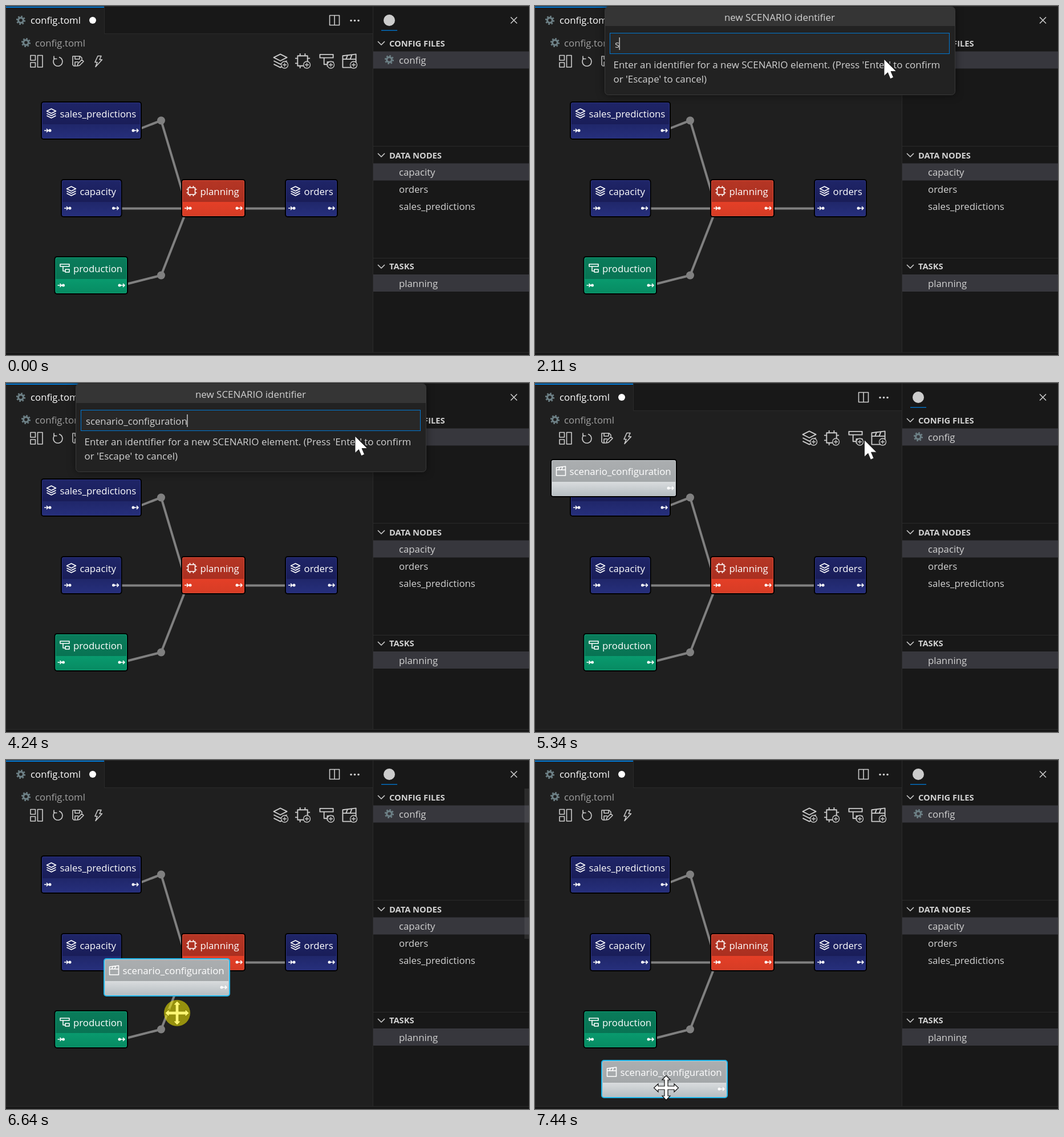
An HTML page for the animation above (8000 ms loop, 917 by 611 pixels).

```html
<!DOCTYPE html>
<html lang="en">
<head>
<meta charset="utf-8">
<title>Configuration editor</title>
<style>
  html, body { margin: 0; width: 100%; height: 100%; overflow: hidden; background: #1f1f1f; }
  svg { display: block; width: 917px; height: 611px; }
  text { font: 16.8px "Open Sans", "Noto Sans", sans-serif; fill: #d2d2d2; white-space: pre; }
  .head { font-size: 14.7px; font-weight: 700; }
  .white { fill: #fff; }
  .line { fill: none; stroke: #ccc; stroke-width: 1.6; stroke-linejoin: round; }
  .icon { fill: none; stroke: #fff; stroke-width: 1.6; stroke-linejoin: round; }
  .tool { stroke: #ccc; stroke-width: 1.3; }
  .link { fill: none; stroke: #808080; stroke-width: 4; }
  .dialog text { font-size: 16.95px; }
  .dialog #typed { font-size: 16.75px; }
  .panel { fill: #222; stroke: #393939; filter: drop-shadow(0 0 7px rgba(0, 0, 0, .5)); }
</style>
</head>
<body>
<svg viewBox="0 0 917 611">
  <defs>
    <g id="layers"><path d="M0-8 8-4 0 0-8-4ZM-8 0 0 4 8 0M-8 4 0 8 8 4"/></g>
    <g id="chip"><path d="M-6-6H6V6H-6ZM-3-6V-9M3-6V-9M-3 6V9M3 6V9M-6-3H-9M-6 3H-9M6-3H9M6 3H9"/></g>
    <g id="flow"><path d="M-8-7H8V-3H-8ZM-3-3V5H1M1 2H8V7H1Z"/></g>
    <g id="clap"><path d="M-8-2H8V8H-8ZM-8-2V-6L8-8V-2M-4-2-2-7M1-2 3-7"/></g>
    <g id="gear" fill="none" stroke="#6d8086">
      <circle r="4.4" stroke-width="3.2"/>
      <circle r="6.8" stroke-width="2.6" stroke-dasharray="2.67 2.67"/>
    </g>
    <g id="plus"><circle r="6" fill="#1f1f1f"/><path d="M-3.5 0H3.5M0-3.5V3.5"/></g>
    <path id="chevron" class="line" d="M-6-3 0 3 6-3"/>
    <linearGradient id="navyTop" x2="0" y2="1"><stop stop-color="#1f2568"/><stop offset="1" stop-color="#191d58"/></linearGradient>
    <linearGradient id="navyLow" x2="0" y2="1"><stop stop-color="#20276a"/><stop offset="1" stop-color="#262f7c"/></linearGradient>
    <linearGradient id="redTop" x2="0" y2="1"><stop stop-color="#b53625"/><stop offset="1" stop-color="#aa2f20"/></linearGradient>
    <linearGradient id="redLow" x2="0" y2="1"><stop stop-color="#e43f27"/><stop offset="1" stop-color="#d63c25"/></linearGradient>
    <linearGradient id="greenTop" x2="0" y2="1"><stop stop-color="#0a7c5b"/><stop offset="1" stop-color="#087353"/></linearGradient>
    <linearGradient id="greenLow" x2="0" y2="1"><stop stop-color="#099a6e"/><stop offset="1" stop-color="#078b62"/></linearGradient>
    <linearGradient id="greyTop" x2="0" y2="1"><stop stop-color="#abaeb0"/><stop offset="1" stop-color="#a3a7a9"/></linearGradient>
    <linearGradient id="greyLow" x2="0" y2="1"><stop stop-color="#d9dcde"/><stop offset="1" stop-color="#b6bdc1"/></linearGradient>
  </defs>

  <!-- editor frame -->
  <rect width="917" height="611" fill="#1f1f1f"/>
  <rect x="172" width="471" height="48" fill="#181818"/>
  <path d="M172.5 1V48.5H643M0 .5H917" fill="none" stroke="#2b2b2b"/>
  <rect y="1" width="172" height="2" fill="#0078d4"/>
  <use href="#gear" x="26" y="25"/>
  <text class="white" x="43" y="31">config.toml</text>
  <circle cx="152" cy="25" r="6" fill="#fff"/>
  <use href="#gear" x="35" y="64"/>
  <text x="51" y="71" style="fill:#a0a0a0">config.toml</text>
  <path class="line" d="M567.5 16.5H584.5V33.5H567.5ZM576 16.5V33.5"/>
  <g fill="#ccc"><circle cx="605" cy="25.5" r="1.8"/><circle cx="611.5" cy="25.5" r="1.8"/><circle cx="618" cy="25.5" r="1.8"/></g>

  <!-- toolbar -->
  <path class="line" d="M43 86.5H51.5V95H43ZM43 99H51.5V107H43ZM55.5 86.5H64V107H55.5Z"/>
  <path class="line" d="M85.5 91.5A8 8 0 1 0 93 89.5M84 87.5V92.5H89.5"/>
  <path class="line" d="M124 105H119L117 103V88H130L133 91V93M121 88V93H129V88M121 105V98H127M125 105 126 101 133 94 136 97 129 104Z"/>
  <path class="line" d="M161 87.5H167L164 94H168.5L157 106.5 160 98.5H156Z"/>
  <rect id="hover" x="588" y="79" width="28" height="36" rx="5" fill="#5a5d5e" fill-opacity=".31"/>
  <g class="icon tool" id="tools"></g>

  <!-- graph -->
  <path class="link" d="M227 218 272 200.5 318 354.5H192M203 489 272 471.5 318 354.5M408 354.5H500"/>
  <circle cx="272" cy="200.5" r="7" fill="#808080"/>
  <circle cx="272" cy="471.5" r="7" fill="#808080"/>
  <g id="nodes"></g>

  <!-- side bar -->
  <rect x="643" y="1" width="274" height="606" fill="#181818"/>
  <rect y="606" width="917" height="5" fill="#181818"/>
  <path d="M643.5 1V606M644 245.5H917M644 441.5H917M0 606.5H917" stroke="#2b2b2b" fill="none"/>
  <circle cx="672" cy="25" r="10" fill="#ccc"/>
  <rect x="658" y="42" width="28" height="1.3" fill="#0078d4"/>
  <path class="line" d="M885 19.5 896 30.5M896 19.5 885 30.5"/>
  <g fill="#37373d"><rect x="644" y="79.5" width="273" height="30"/><rect x="644" y="275.5" width="273" height="30"/><rect x="644" y="470" width="273" height="30"/></g>
  <use href="#chevron" x="658" y="65"/>
  <text class="head" x="672" y="70.5">CONFIG FILES</text>
  <use href="#gear" x="672" y="94"/>
  <text x="689" y="101">config</text>
  <use href="#chevron" x="658" y="261"/>
  <text class="head" x="672" y="266.5">DATA NODES</text>
  <text x="689" y="297">capacity</text>
  <text x="689" y="327">orders</text>
  <text x="689" y="357">sales_predictions</text>
  <use href="#chevron" x="658" y="456"/>
  <text class="head" x="672" y="461">TASKS</text>
  <text x="689" y="491.5">planning</text>
  <rect id="scroll" x="909" y="50" width="8" height="263" fill="#797979" fill-opacity=".2"/>

  <!-- input dialog -->
  <g id="dialog" class="dialog">
    <rect class="panel" x="122.5" y="1.5" width="614" height="154" rx="6"/>
    <path d="M123 35V7.5Q123 2 128.5 2H730.5Q736 2 736 7.5V35Z" fill="#353535"/>
    <text x="429" y="25.5" text-anchor="middle">new SCENARIO identifier</text>
    <rect x="131.5" y="47.5" width="595" height="36" fill="#282828" stroke="#0078d4"/>
    <text id="typed" x="140" y="72.5"></text>
    <rect id="caret" y="55" width="1.3" height="22" fill="#ddd"/>
    <text x="137.5" y="109">Enter an identifier for a new SCENARIO element. (Press 'Enter' to confirm</text>
    <text x="137.5" y="133.5">or 'Escape' to cancel)</text>
  </g>

  <!-- pointer -->
  <g id="pointer">
    <path id="arrow" d="M0 0V29.5L6.5 23.5 11 34.5 16.5 32 12 21.5H21.5Z" fill="#fff" stroke="#111" stroke-width=".8"/>
    <path id="cross" d="M0-21.5 7-14H3V-3H14V-7L21.5 0 14 7V3H3V14H7L0 21.5-7 14H-3V3H-14V7L-21.5 0-14-7V-3H-3V-14H-7Z" fill="#fff" stroke="#111" stroke-width="1.2"/>
    <circle id="press" r="23" fill="#f8ee00" fill-opacity=".55"/>
  </g>
</svg>
<script>
const $ = id => document.getElementById(id);
const show = (id, on) => $(id).setAttribute('visibility', on ? 'inherit' : 'hidden');
const move = (el, x, y) => el.setAttribute('transform', `translate(${x} ${y})`);

const LOOP = 8000;
const NAME = 'scenario_configuration';
const HOME = [612, 93], GRAB = [146, 183], ENTER = [895, 322];
// start time, characters at first and last key of each burst
const BURSTS = [[2110, 1, 8], [2930, 9, 16], [3840, 18, 22]];
// pointer while dragging, one point per 100 ms from 6340
const DRAG = [GRAB, [225, 300], [290, 397], [300, 443], [308, 485], [310, 525], [302, 549],
  [278, 551], [266, 554], [250, 566], [235, 575], [230, 574]];

[['layers', 481, 96], ['chip', 520, 96], ['flow', 562, 95], ['clap', 602, 96]].forEach(([icon, x, y]) => {
  $('tools').innerHTML += `<use href="#${icon}" transform="translate(${x} ${y}) scale(1.45)"/>
    <use href="#plus" x="${x + 7.5}" y="103"/>`;
});

function addNode(id, icon, x, y, w, color, edge, input = true) {
  const ports = (input ? '<path class="icon" d="M6 51H13M10 48 13 51 10 54"/><circle class="white" cx="16" cy="51" r="2.5"/>' : '') +
    `<path class="icon" d="M${w - 14} 51H${w - 6}M${w - 9} 48l3 3-3 3"/><circle class="white" cx="${w - 15}" cy="51" r="2.5"/>`;
  $('nodes').innerHTML += `<g id="${id}" transform="translate(${x} ${y})">
    <rect class="frame" width="${w}" height="67" rx="5" fill="#000"/>
    <path d="M2 40V5Q2 2 5 2H${w - 5}Q${w - 2} 2 ${w - 2} 5V40Z" fill="url(#${color}Top)"/>
    <path d="M2 40V62Q2 65 5 65H${w - 5}Q${w - 2} 65 ${w - 2} 62V40Z" fill="url(#${color}Low)"/>
    <rect x="2.5" y="2.5" width="${w - 5}" height="62" rx="3" fill="none" stroke="${edge}"/>
    <use class="icon" href="#${icon}" x="18.5" y="21"/>
    <text class="white" x="33.5" y="28">${id}</text>${ports}</g>`;
}
addNode('sales_predictions', 'layers', 61, 167, 177, 'navy', '#2b3381');
addNode('capacity', 'layers', 96, 303, 107.5, 'navy', '#2b3381');
addNode('orders', 'layers', 489, 303, 93, 'navy', '#2b3381');
addNode('planning', 'chip', 307, 303, 113, 'red', '#dd4a34');
addNode('production', 'flow', 84.5, 438, 129.5, 'green', '#0da176');
addNode(NAME, 'clap', 27, 133, 222, 'grey', '#c3c8cb', false);

const node = $(NAME), frame = node.querySelector('.frame');

// motion advances in 100 ms ticks
function glide(t, start, length, from, to) {
  const tick = Math.floor((t - start) / 100) * 100;
  const k = Math.min(1, Math.max(0, tick / length));
  const e = k * k * (3 - 2 * k);
  return from.map((a, i) => a + (to[i] - a) * e);
}
const dragAt = t => DRAG[Math.min(DRAG.length - 1, Math.max(0, Math.floor((t - 6340) / 100)))];

function pointerAt(t) {
  if (t < 5240) return glide(t, 100, 500, ENTER, HOME);
  if (t < 6340) return glide(t, 5240, 600, HOME, GRAB);
  return dragAt(t);
}

function typedCount(t) {
  let n = 0;
  for (const [start, first, last] of BURSTS)
    if (t >= start) n = Math.min(last, first + Math.floor((t - start + 15) / 102));
  return n;
}

function draw(t) {
  const [x, y] = pointerAt(t);
  const over = t >= 5340 && x < 249;
  const onNode = over || t >= 6340;
  show('pointer', t >= 100);
  move($('pointer'), x, y);
  show('arrow', !onNode);
  show('cross', onNode);
  show('press', t >= 5940 && t < 7440);
  show('hover', t >= 500 && t < 5340);
  show('scroll', t >= 100 && t < 500 || t >= 6440 && t < 7240);

  show('dialog', t >= 1110 && t < 4340);
  $('typed').textContent = NAME.slice(0, typedCount(t));
  $('caret').setAttribute('x', 139.5 + $('typed').getComputedTextLength());

  // the node trails the pointer by one tick
  const [nx, ny] = t < 6440 ? GRAB : dragAt(t - 100);
  show(NAME, t >= 4340);
  move(node, nx - 119, ny - 50);
  frame.setAttribute('fill', t >= 5940 ? '#1fb6ea' : '#000');
}

const begin = performance.now();
function loop() {
  draw((performance.now() - begin) % LOOP);
  requestAnimationFrame(loop);
}
loop();
</script>
</body>
</html>
```
